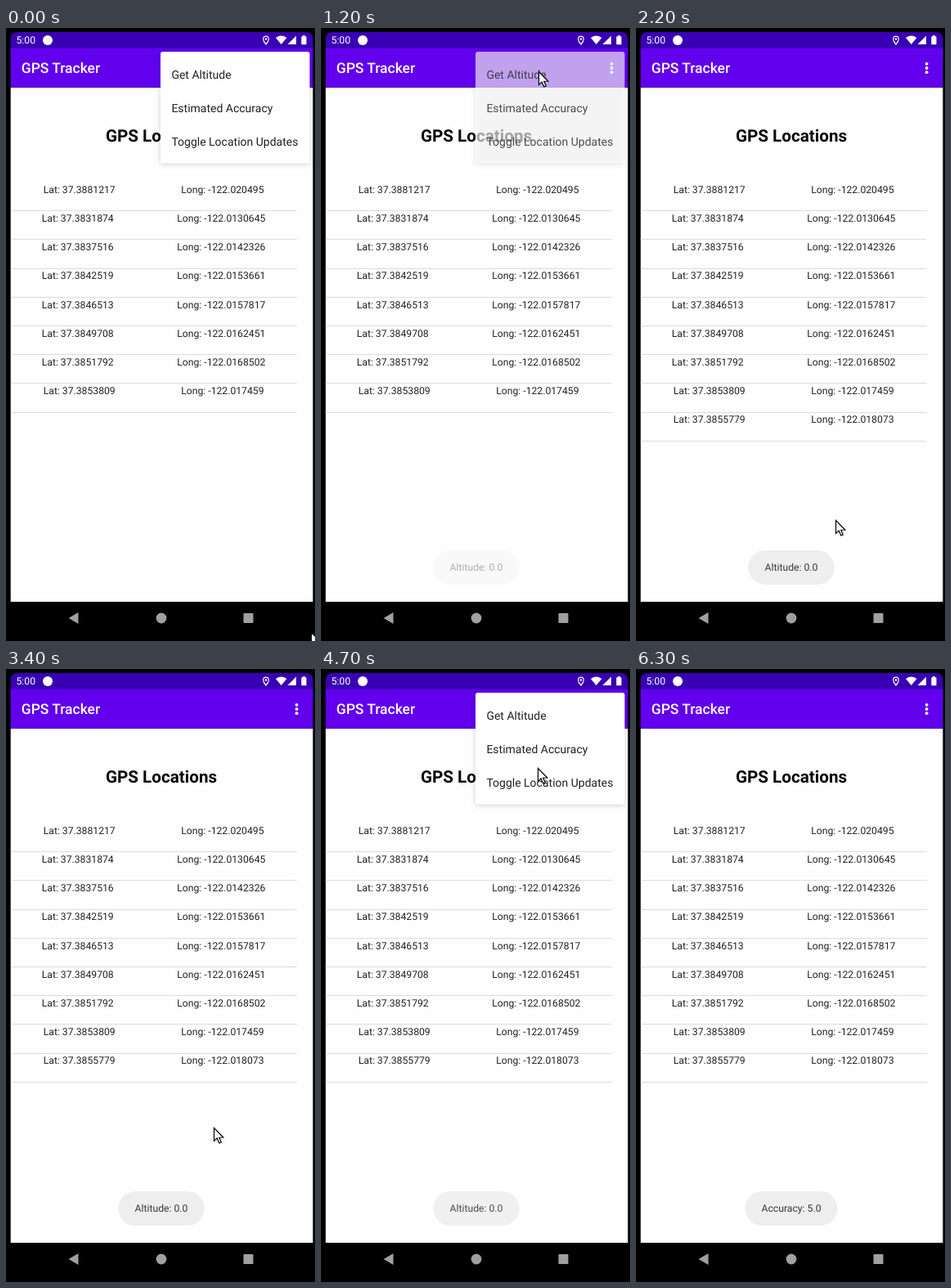
These frames come from a looping animation (378 by 750 pixels, 6.7 s). An HTML page with a canvas:

```html
<!DOCTYPE html>
<html lang="en">
<head>
<meta charset="utf-8">
<title>GPS Tracker</title>
<style>
  html, body { margin: 0; width: 100%; height: 100%; overflow: hidden; background: #000; }
  canvas { display: block; width: 378px; height: 750px; }
</style>
</head>
<body>
<canvas id="stage" width="378" height="750"></canvas>
<script>
const ctx = document.getElementById('stage').getContext('2d');
const LOOP = 6700, STEP = 100, LAST = 6300;
const LEFT = 5.7, WIDTH = 369.7;
const NEW_ROW = 1400;

// Digits after "37.38" and "-122.0", one pair per row
const rows = `81217 20495, 31874 130645, 37516 142326, 42519 153661, 46513 157817,
  49708 162451, 51792 168502, 53809 17459, 55779 18073`
  .split(',').map(pair => pair.trim().split(' '));

// Places the pointer rests or turns: time, x, y
const stops = [
  [0, 373, 739], [800, 268, 56], [1200, 266, 53], [2200, 244, 602], [3400, 254, 561],
  [4000, 352, 43], [4700, 265, 121], [5000, 266, 102], [5400, 287, 326],
  [6000, 316, 530], [6300, 208, 752]
];

const ramp = (t, from, to) => Math.min(1, Math.max(0, (t - from) / (to - from)));
const ease = k => k * k * (3 - 2 * k);
const fadeOut = (t, click) => 1 - ramp(t, click, click + 270);
const fadeIn = (t, click) => ramp(t, click, click + 260);

function pointerAt(t) {
  const i = Math.max(1, stops.findIndex(s => s[0] >= t));
  const [t0, x0, y0] = stops[i - 1], [t1, x1, y1] = stops[i];
  const k = ease(ramp(t, t0, t1));
  return [x0 + (x1 - x0) * k, y0 + (y1 - y0) * k];
}

function box(x, y, w, h, color, radius = 0) {
  ctx.fillStyle = color;
  ctx.beginPath();
  ctx.roundRect(x, y, w, h, radius);
  ctx.fill();
}

function disc(x, y, r, color) {
  ctx.fillStyle = color;
  ctx.beginPath();
  ctx.arc(x, y, r, 0, Math.PI * 2);
  ctx.fill();
}

function shape(path, color) {
  ctx.fillStyle = color;
  ctx.fill(new Path2D(path));
}

function text(str, x, y, size, color, weight = 400, align = 'left') {
  ctx.font = `${weight} ${size}px Roboto, sans-serif`;
  ctx.fillStyle = color;
  ctx.textAlign = align;
  ctx.fillText(str, x, y);
}

function drawStatusIcons() {
  disc(51, 15, 6, '#fff');
  ctx.strokeStyle = '#fff';
  ctx.lineWidth = 1.2;
  ctx.stroke(new Path2D('M318 20Q314.7 16.5 314.7 13.5A3.3 3.3 0 0 1 321.3 13.5Q321.3 16.5 318 20Z'));
  disc(318, 13.5, 1.2, '#fff');
  shape('M336.7 20L330 12Q336.7 7.2 343.4 12Z', '#fff');
  shape('M344.5 20H355V9.5Z', '#fff');
  box(361.3, 10.3, 6.2, 10, '#fff', 0.8);
  box(363, 9, 2.8, 2, '#fff');
}

function drawPhone() {
  box(0, 0, 378, 750, '#000');
  box(LEFT, 5, WIDTH, 30, '#3900b3', [8, 8, 0, 0]);
  box(LEFT, 73, WIDTH, 629, '#fefefe');
  box(LEFT, 24.7, WIDTH, 48, '#6200ee');
  text('5:00', 12.5, 19.2, 12.2, '#fff');
  drawStatusIcons();
  text('GPS Tracker', 18.8, 55.2, 17.45, '#fff', 500);
  for (let i = -1; i <= 1; i++) disc(355.6, 49 + i * 5.2, 1.9, '#fff');

  const gray = '#a0a0a0';
  shape('M76.5 722L88.5 715V729Z', gray);
  disc(190, 722, 6.4, gray);
  box(290.5, 716, 12, 12, gray, 1);
}

function drawTable(count) {
  text('GPS Locations', 190, 139, 20.65, '#080808', 700, 'center');
  rows.slice(0, count).forEach(([lat, long], i) => {
    const y = 201.9 + i * 35.15;
    const short = long.length < 6;
    text('Lat: 37.38' + lat, short ? 45.7 : 43.7, y, 12.2, '#222');
    text('Long: -122.0' + long, short ? 214.2 : 209.2, y, 12.2, '#222');
    box(LEFT, Math.round(223.2 + i * 35.2), 350, 1, '#dcdcdc');
  });
}

function drawToast(label, width, alpha) {
  ctx.globalAlpha = alpha;
  box(190 - width / 2, 639, width, 42, '#eee', 21);
  text(label, 190, 664.2, 12.2, '#383838', 400, 'center');
  ctx.globalAlpha = 1;
}

function drawMenu(alpha) {
  ctx.save();
  ctx.globalAlpha = alpha;
  ctx.shadowColor = 'rgba(0,0,0,.18)';
  ctx.shadowBlur = 7;
  ctx.shadowOffsetY = 1;
  box(189, 29, 182.5, 136.5, '#fff', 3);
  ctx.shadowColor = 'transparent';
  ctx.globalAlpha = Math.sqrt(alpha);
  ['Get Altitude', 'Estimated Accuracy', 'Toggle Location Updates']
    .forEach((s, i) => text(s, 202.4, 61.7 + i * 40.9, 14, '#202020'));
  ctx.restore();
}

function drawPointer([x, y]) {
  ctx.save();
  ctx.translate(x + 0.5, y + 0.5);
  const arrow = 'M0 0V16L3.7 12.6L6.3 18.5L8.8 17.4L6.3 11.7L11.3 11.5Z';
  shape(arrow, '#fff');
  ctx.strokeStyle = '#000';
  ctx.lineWidth = 1.2;
  ctx.stroke(new Path2D(arrow));
  ctx.restore();
}

function render(t) {
  drawPhone();
  drawTable(t < NEW_ROW ? 8 : 9);
  drawToast('Altitude: 0.0', 105.5, fadeIn(t, 1100) * (1 - ramp(t, 4660, 5000)));
  drawToast('Accuracy: 5.0', 113, fadeIn(t, 5000));
  drawMenu(t < 3000 ? fadeOut(t, 1100) : fadeIn(t, 4100) * fadeOut(t, 4900));
  drawPointer(pointerAt(t));
}

ctx.textRendering = 'geometricPrecision';
const start = performance.now();
function tick() {
  const t = (performance.now() - start) % LOOP;
  render(Math.min(LAST, Math.floor(t / STEP) * STEP));
  requestAnimationFrame(tick);
}
tick();
</script>
</body>
</html>
```
